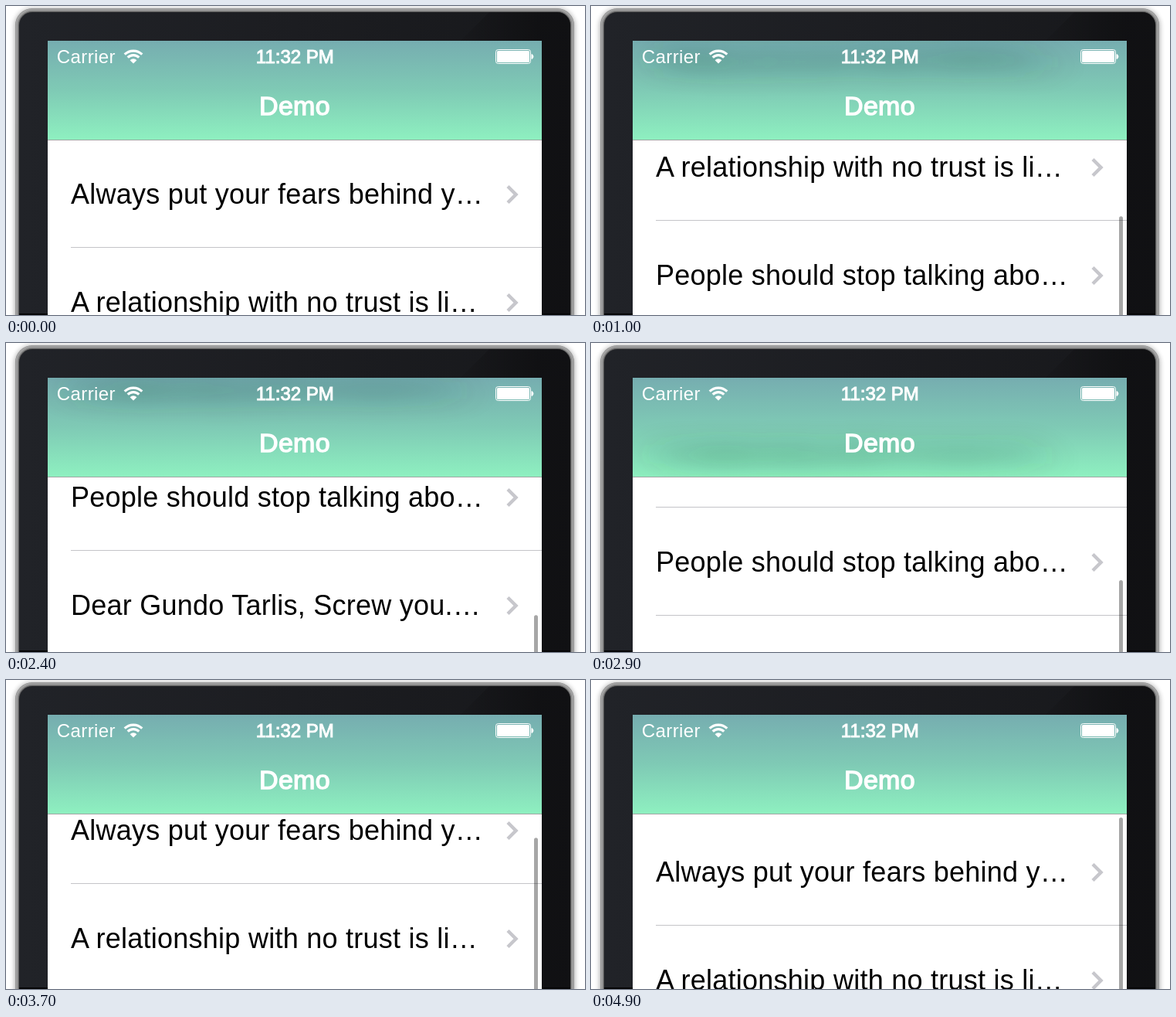
An HTML page for the animation above (5000 ms loop, 750x400 px).

```html
<!DOCTYPE html>
<html lang="en">
<head>
<meta charset="utf-8">
<title>Scrolling list under a gradient bar</title>
<style>
  html, body { margin: 0; width: 100%; height: 100%; overflow: hidden; background: #fff; }
  svg { display: block; width: 750px; height: 400px; }
  text { font-family: "Liberation Sans", Arial, Helvetica, sans-serif; white-space: pre; }
  .row { font-size: 36px; letter-spacing: .25px; }
  .medium { fill: #fff; stroke: #fff; text-anchor: middle; }
</style>
</head>
<body>
<svg viewBox="0 0 750 400" xmlns="http://www.w3.org/2000/svg">
  <defs>
    <linearGradient id="bezel">
      <stop offset="0" stop-color="#212328"/>
      <stop offset=".5" stop-color="#1c1d21"/>
      <stop offset="1" stop-color="#17181b"/>
    </linearGradient>
    <linearGradient id="gloss" gradientUnits="userSpaceOnUse" x1="595" y1="0" x2="690" y2="0">
      <stop offset="0" stop-color="#0f0f11" stop-opacity=".15"/>
      <stop offset="1" stop-color="#0f0f11" stop-opacity=".8"/>
    </linearGradient>
    <linearGradient id="tint" x2="0" y2="1">
      <stop offset="0" stop-color="#76adb0"/>
      <stop offset=".5" stop-color="#7fcab5"/>
      <stop offset="1" stop-color="#8ef0c0"/>
    </linearGradient>
    <clipPath id="screen"><rect x="54" y="45" width="640" height="355"/></clipPath>
    <clipPath id="barArea"><rect x="54" y="45" width="640" height="128"/></clipPath>
    <clipPath id="blurArea"><rect x="54" y="20" width="640" height="153"/></clipPath>
    <filter id="blur" filterUnits="userSpaceOnUse" x="-40" y="-60" width="840" height="320">
      <feGaussianBlur stdDeviation="26 17"/>
    </filter>
    <filter id="soft" filterUnits="userSpaceOnUse" x="0" y="-10" width="750" height="430">
      <feGaussianBlur stdDeviation="3"/>
    </filter>
  </defs>

  <rect width="750" height="400" fill="#fff"/>
  <rect x="11" y="3" width="726" height="460" rx="23" fill="#000" opacity=".3" filter="url(#soft)"/>
  <rect x="12" y="3" width="724" height="460" rx="22" fill="#8c8c8c"/>
  <rect x="13.5" y="4.5" width="721" height="460" rx="20.5" fill="none" stroke="#a4a4a4" stroke-width="2"/>
  <rect x="16" y="7" width="716" height="460" rx="18" fill="#5c5c5c"/>
  <rect x="17" y="8" width="714" height="460" rx="17" fill="url(#bezel)"/>
  <path d="M626 8H714a17 17 0 0 1 17 17V400H694V45H589Z" fill="url(#gloss)"/>
  <path d="M17 398H54V400H17ZM694 398H731V400H694Z" fill="#050506"/>

  <g clip-path="url(#screen)">
    <rect x="54" y="45" width="640" height="355" fill="#fff"/>
    <g id="list">
      <g id="labels"></g>
      <g id="marks"></g>
    </g>
    <rect id="thumb" x="684" width="5" height="300" rx="2.5" opacity=".35"/>
    <rect x="54" y="45" width="640" height="128" fill="url(#tint)"/>
    <g clip-path="url(#barArea)">
      <g filter="url(#blur)" opacity=".78">
        <g clip-path="url(#blurArea)"><g id="ghost" fill="#00382f"></g></g>
      </g>
    </g>
    <rect x="54" y="173" width="640" height="1" fill="#a2a6a4"/>

    <text x="65.8" y="74" font-size="24" letter-spacing=".4" fill="#fff">Carrier</text>
    <g fill="none" stroke="#fff" stroke-width="3.2">
      <path d="M153.7 62.7A16 16 0 0 1 176.3 62.7"/>
      <path d="M157.7 66.7A10.3 10.3 0 0 1 172.3 66.7"/>
      <path d="M165 74.6L160.6 70.2A6.2 6.2 0 0 1 169.4 70.2Z" fill="#fff" stroke="none"/>
    </g>
    <text class="medium" x="374.3" y="74" font-size="24" stroke-width="1">11:32 PM</text>
    <rect x="634.5" y="56.5" width="45" height="18" rx="3" fill="none" stroke="#fff"/>
    <rect x="636" y="58" width="42" height="15" rx="1.5" fill="#fff"/>
    <path d="M681 62.5a3.3 3.3 0 0 1 0 6Z" fill="#fff" stroke="#fff"/>
    <text class="medium" x="374" y="141" font-size="34" letter-spacing=".3" stroke-width="1.4">Demo</text>
  </g>
</svg>
<script>
  const NS = "http://www.w3.org/2000/svg";
  const LOOP = 5000, STEP = 100, PITCH = 140;
  const rows = [
    "Always put your fears behind y…",
    "A relationship with no trust is li…",
    "People should stop talking abo…",
    "Dear Gundo Tarlis, Screw you.…"
  ];
  // time in ms, scroll offset in px, speed in px per ms
  const keys = [
    [0, 0, .08], [1000, 175, .17], [1800, 284, .1], [2400, 324, 0],
    [3300, 137, -.2], [4200, -14, 0], [4800, -7, .016], [5000, -3, .02]
  ];
  const byId = id => document.getElementById(id);

  function add(parent, tag, attrs, content = "") {
    const el = document.createElementNS(NS, tag);
    for (const name in attrs) el.setAttribute(name, attrs[name]);
    el.textContent = content;
    parent.appendChild(el);
  }

  rows.forEach((label, i) => {
    const y = i * PITCH;
    for (const id of ["labels", "ghost"])
      add(byId(id), "text", { class: "row", x: 84, y: 255.5 + y }, label);
    add(byId("marks"), "path", {
      d: `M650 ${233.5 + y}l10.5 10.5l-10.5 10.5`,
      fill: "none", stroke: "#c7c7cc", "stroke-width": 4.5
    });
    add(byId("marks"), "rect", { x: 84, y: 312 + y, width: 610, height: 1, fill: "#c4c4c8" });
  });

  function scrollAt(t) {
    const i = keys.findIndex(k => k[0] > t);
    const [t0, p0, v0] = keys[i - 1], [t1, p1, v1] = keys[i];
    const d = t1 - t0, u = (t - t0) / d, w = 1 - u;
    return w * w * ((1 + 2 * u) * p0 + u * d * v0) + u * u * ((3 - 2 * u) * p1 - w * d * v1);
  }

  function draw(now) {
    const t = Math.floor((now % LOOP) / STEP) * STEP;
    const scroll = Math.round(scrollAt(t));
    const shift = `translate(0 ${-scroll})`;
    byId("list").setAttribute("transform", shift);
    byId("ghost").setAttribute("transform", shift);
    byId("thumb").setAttribute("y", 178 + Math.max(0, scroll) * .538);
    byId("thumb").setAttribute("visibility", t ? "visible" : "hidden");
  }

  const start = performance.now();
  function tick() {
    draw(performance.now() - start);
    requestAnimationFrame(tick);
  }
  tick();
</script>
</body>
</html>
```
